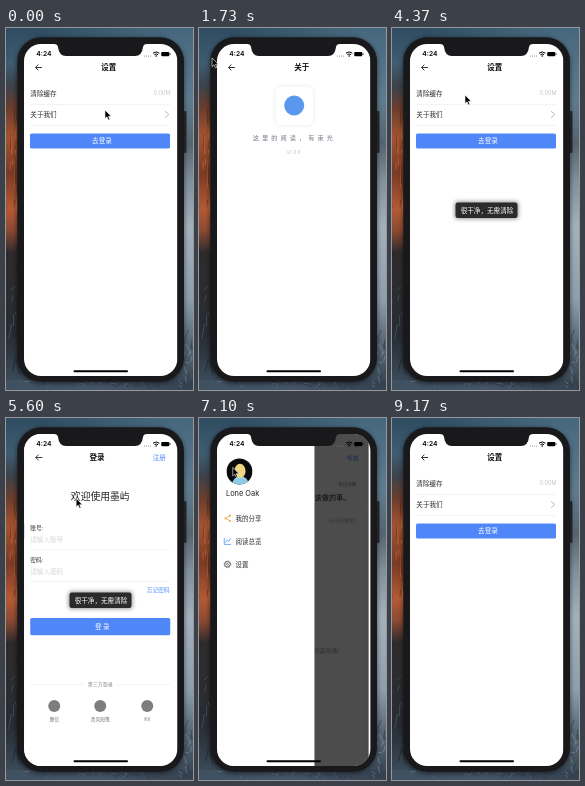
Write an HTML page that moves like this. It is 187x362 px and loops after 9.43 s.

```html
<!DOCTYPE html>
<html lang="zh-CN">
<head>
<meta charset="utf-8">
<title>设置</title>
<style>
html, body { margin: 0; width: 100%; height: 100%; overflow: hidden; }
svg { display: block; width: 187px; height: 362px; }
text { font-family: "Noto Sans CJK SC", "Noto Sans CJK", "Noto Sans", sans-serif; }
.latin { font-family: Inter, Roboto, sans-serif; }
</style>
</head>
<body>
<svg id="stage" viewBox="0 0 187 362" xmlns="http://www.w3.org/2000/svg"></svg>
<script>
const LOOP = 9430, SLIDE = 500, WIDTH = 153.4;
const BLUE = '#4f87f8', INK = '#2b2b2b', PALE = '#c9c9cd';

// Drawing helpers; y is the vertical middle of the text
const text = (s, x, y, size, fill = INK, extra = '') =>
  `<text x="${x}" y="${y + size * 0.37}" font-size="${size}" fill="${fill}" ${extra}>${s}</text>`;
const MID = 'text-anchor="middle"', END = 'text-anchor="end"';
const rect = (x, y, w, h, fill, rx = 0, extra = '') =>
  `<rect x="${x}" y="${y}" width="${w}" height="${h}" rx="${rx}" fill="${fill}" ${extra}/>`;
const line = (d, stroke, width = 0.7, extra = '') =>
  `<path d="${d}" fill="none" stroke="${stroke}" stroke-width="${width}" ${extra}/>`;
const dot = (x, y, r, fill, extra = '') =>
  `<circle cx="${x}" cy="${y}" r="${r}" fill="${fill}" ${extra}/>`;
const rule = (y, x1 = 24, x2 = 164) => rect(x1, y, x2 - x1, 0.5, '#e6e6e8');
const gradient = (id, vertical, stops) =>
  `<linearGradient id="${id}" x2="${vertical ? 0 : 1}" y2="${vertical ? 1 : 0}">` +
  stops.map(([o, c, a = 1]) => `<stop offset="${o}" stop-color="${c}" stop-opacity="${a}"/>`).join('') +
  '</linearGradient>';
const page = (id, body) =>
  `<g id="${id}">${rect(10, 16, 8, 332, 'url(#edge)', 0, `id="${id}Edge"`)}` +
  `${rect(18, 16, WIDTH, 332, '#fff')}${body}</g>`;
const header = (title, x) =>
  line('M36 39.5H29.6M32.4 36.6L29.5 39.5L32.4 42.4', '#222', 0.9) +
  text(title, x, 39.5, 7.5, '#111', MID + ' font-weight="700"');
const button = (id, label, y, h) =>
  `<g id="${id}">${rect(24, y, 140, h, BLUE, 1.6)}${text(label, 96, y + h / 2, 6.6, '#fff', MID)}</g>`;

const defs = `<defs>
  ${gradient('left', true, [[0, '#2f4c61'], [0.1, '#3f5c70'], [0.16, '#3b424b'], [0.22, '#6a3d2d'],
    [0.3, '#a4532f'], [0.4, '#7a3a24'], [0.5, '#b45a35'], [0.56, '#8a4a33'], [0.62, '#2f2b2c'],
    [0.85, '#272d34'], [1, '#3f5060']])}
  ${gradient('right', true, [[0, '#45677d'], [0.2, '#5f7c8f'], [0.32, '#57646f'],
    [0.42, '#7f8f9b'], [0.55, '#a3b1bc'], [0.75, '#8d9eac'], [0.86, '#5a6b79'], [1, '#34424f']])}
  ${gradient('top', false, [[0, '#2f4c61'], [0.5, '#3b5a6f'], [1, '#45677d']])}
  ${gradient('bottom', false, [[0, '#3f5060'], [0.5, '#46566a'], [1, '#34424f']])}
  ${gradient('edge', false, [[0, '#000', 0], [1, '#000', 0.28]])}
  <clipPath id="screen">${rect(18, 16, WIDTH, 332, '#000', 17)}</clipPath>
  <clipPath id="face">${dot(41, 53.5, 13, '#000')}</clipPath>
  <filter id="soft" x="-30%" y="-30%" width="160%" height="160%"><feGaussianBlur stdDeviation="2"/></filter>
</defs>`;

let seed = 7;
const random = () => (seed = seed * 16807 % 2147483647) / 2147483647;
const streaks = (n, x, y, w, h, dx, dy, colors) => Array.from({ length: n }, (_, i) => {
  const px = x + random() * w, py = y + random() * h;
  return line(`M${px} ${py}l${dx * (random() - 0.5)} ${dy * random()}`, colors[i % colors.length], 1, 'opacity=".5"');
}).join('');

const wallpaper = rect(0, 0, 187, 362, 'url(#top)') +
  rect(0, 0, 30, 362, 'url(#left)') + rect(160, 0, 27, 362, 'url(#right)') +
  rect(30, 0, 130, 12, 'url(#top)') + rect(0, 352, 187, 10, 'url(#bottom)') +
  streaks(16, 0, 75, 12, 110, 2, 34, ['#4a2419', '#d07a4c']) +
  streaks(12, 0, 225, 12, 120, 8, 16, ['#15181c', '#5a6c7b']) +
  streaks(14, 178, 300, 9, 50, 10, 10, ['#25313c', '#8fa0ae']) +
  streaks(24, 10, 353, 170, 5, 12, 5, ['#25313c', '#8295a4']);

const phone = rect(10.5, 10, 168, 346, '#000', 25, 'opacity=".45" filter="url(#soft)"') +
  rect(178, 83, 2.4, 42, '#202225', 1) + rect(11.3, 9.2, 166.7, 344.6, '#19191b', 24);

const chart = line('M25.8 120V126.4H32.6', '#4c98ea', 0.8) +
  line('M27 124.6L28.8 122L30.2 123.4L32.4 120.2', '#4c98ea', 0.8);
const share = line('M32 97.6L27 100.4L32 103', '#f0ad4a', 0.8) +
  [[31.6, 97.7], [27, 100.4], [31.6, 103]].map(([x, y]) => dot(x, y, 1.1, '#f0ad4a')).join('');
const gear = dot(29, 146.3, 2.8, 'none', 'stroke="#555" stroke-width=".9"') +
  dot(29, 146.3, 1, 'none', 'stroke="#555" stroke-width=".7"') +
  dot(29, 146.3, 3.4, 'none', 'stroke="#555" stroke-width=".7" stroke-dasharray="1.3 1.37"');
const avatar = `<g clip-path="url(#face)">${rect(28, 40, 26, 27, '#0b0b0d')}
  <ellipse cx="42" cy="67" rx="8.5" ry="9" fill="#8ecbe8"/>
  <ellipse cx="41.5" cy="53" rx="5.6" ry="7.2" fill="#f0d684"/></g>`;

const home = page('home',
  text('书城', 154, 39.5, 6.2, BLUE, MID) +
  text('今日书单', 158, 66, 4.6, '#777', END) +
  text('做自己应该做的事。', 152, 79, 7.2, '#222', END + ' font-weight="500"') +
  rule(90) + text('—《无名的随笔》', 160, 102, 4.6, '#aaa', END) +
  text('每天都有新的喜欢哦!', 141, 233, 6, '#999', END) +
  rect(18, 16, WIDTH, 332, 'rgba(0,0,0,.7)') + rect(18, 16, 98, 332, '#fff') +
  avatar + text('Lone Oak', 27.5, 75, 7.4, '#222', 'class="latin"') +
  share + text('我的分享', 37, 100.4, 6.5) +
  chart + text('阅读总览', 37, 123.4, 6.5) +
  `<g id="menuRow">${gear}${text('设置', 37, 146.4, 6.5)}</g>`);

const settings = page('settings', header('设置', 102.8) +
  `<g id="cacheRow">${text('清除缓存', 24.3, 65.4, 6.6)}${text('0.00M', 164.5, 65.4, 5.6, PALE, END + ' class="latin"')}</g>` +
  rule(76) +
  `<g id="aboutRow">${text('关于我们', 24.3, 86.5, 6.6)}${line('M159 83.2L162.8 86.5L159 89.8', '#aaa', 0.8)}</g>` +
  rule(97) + button('loginBtn', '去登录', 105.5, 15));

const about = page('about', header('关于', 102.8) +
  rect(76.5, 58.5, 37.5, 38.5, '#9aa4b4', 6, 'opacity=".28" filter="url(#soft)"') +
  rect(76.5, 58.5, 37.5, 38.5, '#fff', 5.5) + dot(95.2, 77.5, 10, '#5a97ee') +
  text('这里的阅读，有束光', 53.8, 109.5, 6.2, '#6d7580', 'letter-spacing="3.05"') +
  text('v1.0.0', 95, 124, 4.4, '#b5b5b8', MID + ' class="latin" letter-spacing=".3"'));

const field = (label, hint, y) =>
  text(label, 24, y, 5.7) + text(hint, 24, y + 11.5, 6.6, '#d5d5d8') + rule(y + 21.5);
const partner = (label, x) => dot(x, 288, 6, '#7d7d7d') + text(label, x, 301.3, 4.8, '#777', MID);
const login = page('login', header('登录', 90.7) +
  text('注册', 159.6, 39.5, 6.6, BLUE, END) +
  text('欢迎使用墨屿', 94, 78, 9.8, '#222', MID) +
  field('账号:', '请输入账号', 110.2) + field('密码:', '请输入密码', 141.7) +
  text('忘记密码', 163.5, 172.2, 5.7, BLUE, END) + button('', '登 录', 200, 17.2) +
  rule(266.5, 24, 77) + text('第三方登录', 94, 266.5, 5, '#8a8a8a', MID) + rule(266.5, 111, 164) +
  partner('鹿信', 48) + partner('青岚短笺', 94) + partner('KX', 141));

const toast = `<g id="toast">${rect(62.5, 173.5, 64, 17.5, '#000', 3, 'opacity=".4" filter="url(#soft)"')}
  ${rect(63.5, 174.5, 62, 15.5, '#2b2b2b', 2.2)}${text('很干净，无需清除', 95, 182.3, 6.6, '#fff', MID)}</g>`;

const status = text('4:24', 30.3, 26, 6.7, '#000', 'class="latin" font-weight="600"') +
  [138.5, 140.5, 142.5, 144.5].map(x => dot(x, 28, 0.5, '#777')).join('') +
  line('M147 25.2Q150.2 22.6 153.4 25.2M148.4 26.7Q150.2 25.2 152 26.7', '#000', 1) + dot(150.2, 28, 0.8, '#000') +
  rect(155.2, 23.9, 8.2, 4.3, '#000', 1.2) + rect(163.8, 25.2, 0.7, 1.7, '#000', 0.3);
const notch = '<path d="M48 15H141V16Q137.5 16 137 19Q136 28 129 28H60Q53 28 52 19Q51.5 16 48 16Z" fill="#19191b"/>';
const cursor = '<path id="cursor" d="M0 0V8.6L2 6.8L3.4 9.9L4.8 9.3L3.5 6.3H6.2Z" fill="#000" stroke="#fff" stroke-width=".6"/>';

document.getElementById('stage').innerHTML = defs + wallpaper + phone +
  `<g clip-path="url(#screen)">${home}${settings}${about}${login}${toast}${status}
  ${rect(67.5, 342.3, 54.5, 2, '#000', 1)}</g>` + notch + cursor;

const $ = id => document.getElementById(id);
const clamp = v => Math.min(1, Math.max(0, v));
const ease = u => 1 - (1 - clamp(u)) ** 4;
const slide = (t, start) => ease((t - start) / SLIDE);
const ramp = (t, start, span) => clamp((t - start) / span);

// time, x, y
const track = [
  [0, 99, 82], [630, 92, 86], [1400, 92, 86], [1730, 13, 30], [1900, 18, 32], [2400, 34, 37],
  [3000, 34, 37], [3700, 73, 67], [4370, 73, 67], [4900, 95, 112], [5250, 95, 112],
  [6000, 40, 42], [6450, 30, 38], [6950, 30, 38], [7700, 66, 146], [7830, 65, 144],
  [8600, 65, 144], [9150, 70, -14], [LOOP, 70, -14]
];
function pointer(t) {
  const i = track.findIndex(k => k[0] > t);
  const [t0, x0, y0] = track[i - 1], [t1, x1, y1] = track[i];
  const u = (t - t0) / (t1 - t0), e = u * u * (3 - 2 * u);
  return [x0 + (x1 - x0) * e, y0 + (y1 - y0) * e];
}

// id, press time, release time, press fade, pressed opacity
const presses = [
  ['aboutRow', 770, 930, 1, 0.6], ['cacheRow', 3820, 3980, 100, 0.5],
  ['loginBtn', 5020, 5200, 100, 0.6], ['menuRow', 8000, 8370, 170, 0.7]
];

function move(id, x, y = 0) { $(id).setAttribute('transform', `translate(${x} ${y})`); }
function place(id, open, cover) {
  move(id, (1 - open) * WIDTH - 0.3 * WIDTH * cover);
  $(id).style.visibility = open > 0 && cover < 1 ? 'visible' : 'hidden';
  $(id + 'Edge').style.opacity = Math.min(1, open * 1.1 + 0.1);
}

const LEAVE = 6765; // login returns straight to the home drawer
function draw(t) {
  const aboutOpen = slide(t, 925) - slide(t, 2612);
  const loginOpen = slide(t, 5200) - slide(t, LEAVE);
  const settingsOpen = t < LEAVE ? 1 : slide(t, 8365);
  place('home', 1, Math.max(settingsOpen, loginOpen));
  place('settings', settingsOpen, Math.max(aboutOpen, loginOpen));
  if (t >= LEAVE && t < 8365) $('settings').style.visibility = 'hidden';
  place('about', aboutOpen, 0);
  place('login', loginOpen, 0);
  for (const [id, down, up, fade, low] of presses)
    $(id).style.opacity = 1 - (1 - low) * (ramp(t, down, fade) - ramp(t, up, 200));
  $('toast').style.opacity = ramp(t, 4000, 200) - ramp(t, 6470, 150);
  move('cursor', ...pointer(t));
}

const began = performance.now();
function tick() {
  draw((performance.now() - began) % LOOP);
  requestAnimationFrame(tick);
}
tick();
</script>
</body>
</html>
```
